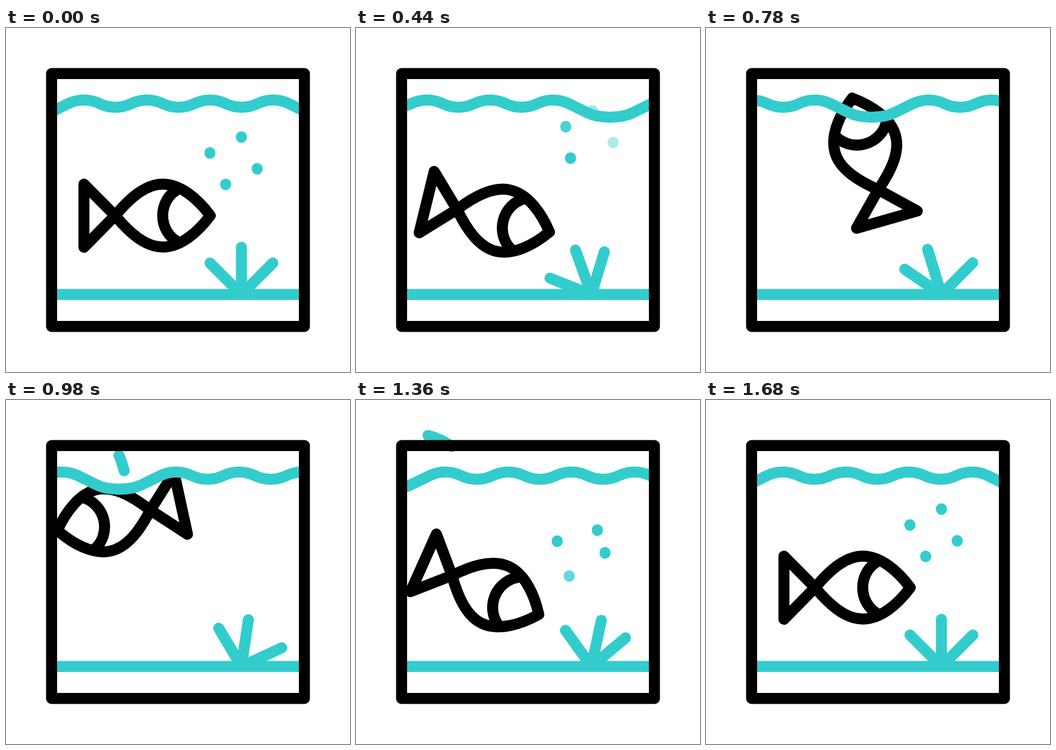
Animation of 640x640 px, one loop 1.7 s. Source, as an HTML page:

```html
<!DOCTYPE html>
<html lang="en">
<head>
<meta charset="utf-8">
<title>Aquarium</title>
<style>
  html, body { margin: 0; width: 100%; height: 100%; overflow: hidden; background: #fff; }
  svg { display: block; width: 100vw; height: 100vh; }
  svg * { fill: none; stroke-width: 20.5; stroke-linecap: round; stroke-linejoin: round; }
  .teal { stroke: #33cccc; }
  .ink { stroke: #000; }
</style>
</head>
<body>
<svg viewBox="0 0 640 640">
  <clipPath id="tank"><rect x="75" y="75" width="490" height="490"/></clipPath>
  <g id="bubbles" class="teal"></g>
  <g clip-path="url(#tank)">
    <g id="fish" class="ink">
      <path d="M380 349C357 318 325 290.5 291.5 290.5S228 319 203 349L145 408V290.5L203 349C228 379 258 407.5 291.5 407.5S357 380 380 349Z"/>
      <path d="M322 299C303 308 291.5 328 291.5 349S303 390 322 399"/>
    </g>
  </g>
  <g id="splash" class="teal"></g>
  <g clip-path="url(#tank)"><path id="wave" class="teal"/></g>
  <path class="teal" d="M90 495.7H550"/>
  <g id="plant" class="teal"></g>
  <rect class="ink" x="84.8" y="84.8" width="470.4" height="470.4"/>
</svg>
<script>
const LOOP = 1700, SWIM_END = 1515;
const $ = id => document.getElementById(id);
const clamp = v => Math.min(1, Math.max(0, v));
const ramp = (t, a, b) => clamp((t - a) / (b - a));

// Ease in and out along cubic-bezier(.25, 0, .75, 1)
function ease(x) {
  let lo = 0, hi = 1;
  for (let i = 0; i < 24; i++) {
    const u = (lo + hi) / 2, v = 1 - u;
    if (.75 * u * v * v + 2.25 * u * u * v + u * u * u < x) lo = u; else hi = u;
  }
  return lo * lo * (3 - 2 * lo);
}

// keys: [time, value] pairs, eased between neighbours
function track(keys, t) {
  if (t <= keys[0][0]) return keys[0][1];
  for (let i = 1; i < keys.length; i++) {
    const [a, from] = keys[i - 1], [b, to] = keys[i];
    if (t < b) return from + (to - from) * ease((t - a) / (b - a));
  }
  return keys[keys.length - 1][1];
}

function addPath(parent, d) {
  const el = document.createElementNS('http://www.w3.org/2000/svg', 'path');
  el.setAttribute('d', d);
  return $(parent).appendChild(el);
}

const PERIOD = 564;
const crest = 'c18.4-9 40.27-9 58.67 0';
const dip = 'c18.4 9 40.27 9 58.67 0';
const swell = 'l34.7 17c22 10.8 61.9 10.8 83.9 0l34.7-17';
const unit = (crest + dip).repeat(3) + crest + swell;
$('wave').setAttribute('d', `M${145 - 29.33 - PERIOD} 140.8` + unit.repeat(3));
const waveKeys = [[0, 0], [SWIM_END, -566]];
const fishKeys = [[0, 0], [325, 28.5], [SWIM_END, -360]];

// Leaves: tip offset from the root, delay, end of sway
const leaves = [[-58.5, -58.5, 78, 1600], [0, -87.7, 130, 1655], [58.5, -58.5, 0, 1515]]
  .map(([x, y, delay, end]) => ({
    el: addPath('plant', `M438 495.7l${x} ${y}`),
    keys: [[delay, 0], [495 + delay, -29.5], [1005 + delay, 20.7], [end, 0]]
  }));

// Bubbles: place, sway out and in, depth of return, fade-out span, fade-in span
const bubbles = [
  [438, 203, 2, 11, 195, 360, 510, 1180, 1330],
  [379.3, 232.5, 12.7, -5, 150, 420, 610, 1130, 1280],
  [467.3, 262, 12.7, -4, 112, 350, 500, 1080, 1230],
  [408.7, 291, -11, -12, 182, 480, 680, 1250, 1397]
].map(([x, y, out, back, depth, ...fade]) =>
  ({ el: addPath('bubbles', `M${x} ${y - .6}v1.2`), out, back, depth, fade }));

// Splash streaks: curve points, head span, tail span
const streaks = [
  { pts: [225, 155, 210, 70, 150, 20], head: [883, 1180], tail: [930, 1290] },
  { pts: [225, 155, 200, 83, 134, 66], head: [1100, 1340], tail: [1180, 1470] }
].map(s => ({ ...s, el: addPath('splash', 'M0 0') }));

// Part of a quadratic curve between parameters a and b
function slice([x0, y0, x1, y1, x2, y2], a, b) {
  const blend = (p, q, r, u, v) => p * (1 - u) * (1 - v) + q * (u + v - 2 * u * v) + r * u * v;
  const at = (u, v) => blend(x0, x1, x2, u, v) + ' ' + blend(y0, y1, y2, u, v);
  return `M${at(a, a)}Q${at(a, b)} ${at(b, b)}`;
}

function draw(t) {
  $('wave').setAttribute('transform', `translate(${track(waveKeys, t)} 0)`);
  $('fish').setAttribute('transform', `rotate(${track(fishKeys, t)} 243.5 280.5)`);
  for (const l of leaves) l.el.setAttribute('transform', `rotate(${track(l.keys, t)} 438 495.7)`);

  for (const b of bubbles) {
    const leaving = t < 800, left = 1680 - t;
    const x = leaving ? b.out * Math.sin(Math.PI * Math.min(t, 660) / 660)
                      : b.back * Math.sin(Math.PI * clamp(left / 640));
    const y = leaving ? -150 * ease(t / 1200) : b.depth * ease(clamp(left / 1200));
    b.el.setAttribute('transform', `translate(${x} ${y})`);
    b.el.setAttribute('opacity', leaving ? 1 - ramp(t, b.fade[0], b.fade[1]) : ramp(t, b.fade[2], b.fade[3]));
  }

  for (const s of streaks) {
    const head = ramp(t, ...s.head), tail = ramp(t, ...s.tail);
    const shown = head > 0 && tail < 1;
    s.el.setAttribute('visibility', shown ? 'visible' : 'hidden');
    if (shown) s.el.setAttribute('d', slice(s.pts, tail, head));
  }
}

const start = performance.now();
function tick() {
  draw((performance.now() - start) % LOOP);
  requestAnimationFrame(tick);
}
tick();
</script>
</body>
</html>
```
